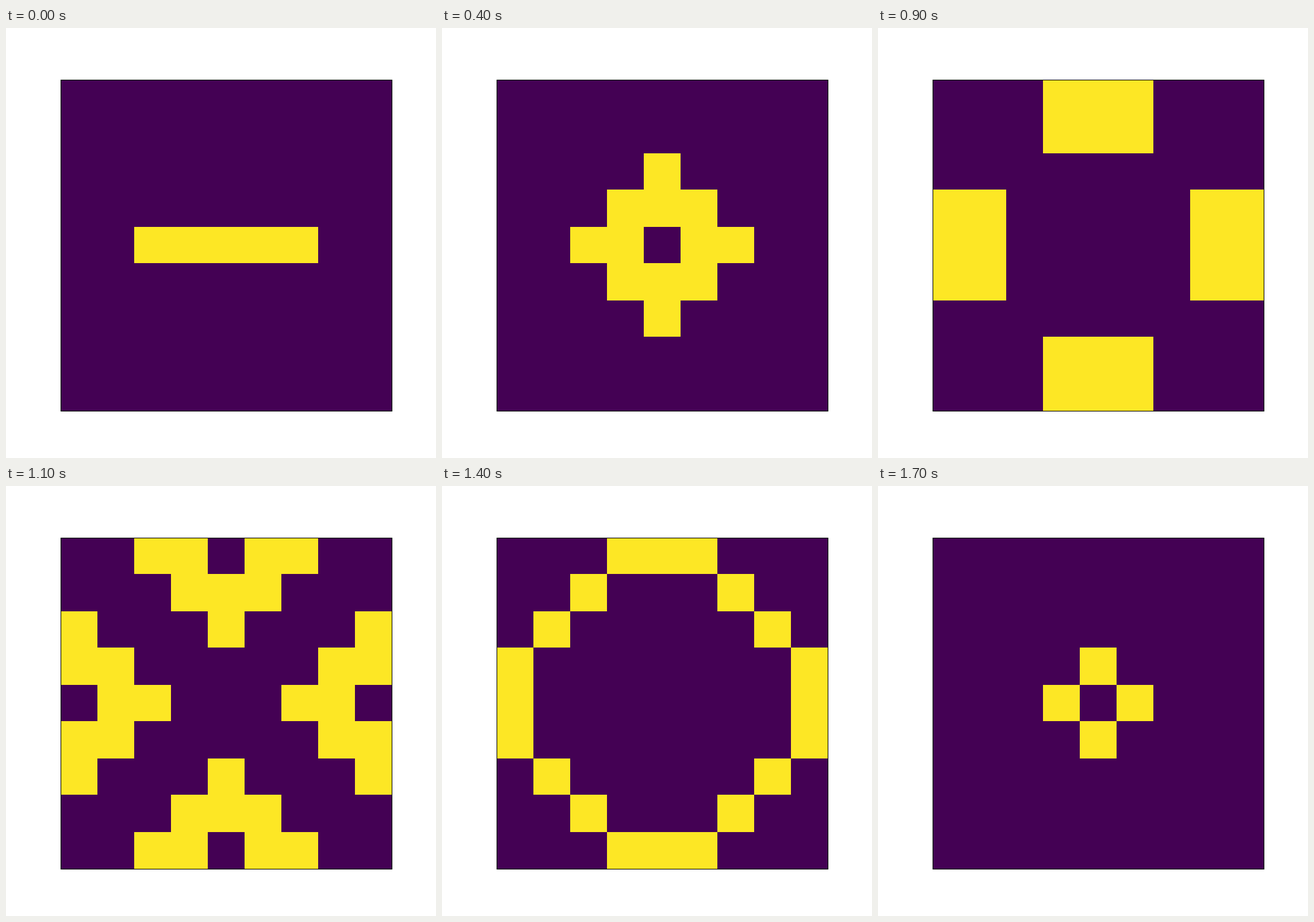
Animation of 748 by 748 pixels, one loop 1800 ms. Source, as an HTML page with a canvas:

```html
<!DOCTYPE html>
<html>
<head>
<meta charset="utf-8">
<title>Game of Life</title>
<style>
  html, body { margin: 0; width: 100%; height: 100%; overflow: hidden; background: #fff; }
  canvas { display: block; }
</style>
</head>
<body>
<canvas id="stage" width="748" height="748"></canvas>
<script>
const ctx = document.getElementById('stage').getContext('2d');
const N = 9, CELL = 64, STEP = 100, LOOP = 1800;

// Game of Life on a torus, starting from a row of five cells
function next(grid) {
  const alive = (r, c) => grid[(r + N) % N][(c + N) % N];
  return grid.map((row, r) => row.map((cell, c) => {
    let sum = -cell;
    for (let dr = -1; dr <= 1; dr++)
      for (let dc = -1; dc <= 1; dc++) sum += alive(r + dr, c + dc);
    return +(sum === 3 || (cell && sum === 2));
  }));
}

const generations = [Array.from({ length: N }, (_, r) =>
  Array.from({ length: N }, (_, c) => +(r === 4 && c >= 2 && c <= 6)))];
while (generations.length < LOOP / STEP - 1) generations.push(next(generations.at(-1)));

// Cell edges, snapped to whole pixels
const left = c => 95 + CELL * c;
const top_ = r => r === 0 ? 90 : r === N ? 666 : 89 + CELL * r + (r % 2 === 0);

function draw(grid) {
  ctx.fillStyle = '#fff';
  ctx.fillRect(0, 0, 748, 748);
  ctx.fillStyle = '#440154';
  ctx.fillRect(95, 90, 577, 577);
  ctx.fillStyle = '#fde725';
  grid.forEach((row, r) => row.forEach((cell, c) => {
    if (cell) ctx.fillRect(left(c), top_(r), left(c + 1) - left(c), top_(r + 1) - top_(r));
  }));
  ctx.strokeStyle = '#000';
  ctx.lineWidth = 1.11;
  ctx.strokeRect(95.5, 90.5, 576, 576);
}

const start = performance.now();
function tick() {
  const t = (performance.now() - start) % LOOP;
  draw(generations[Math.max(0, Math.floor(t / STEP) - 1)]);
  requestAnimationFrame(tick);
}
tick();
</script>
</body>
</html>
```
